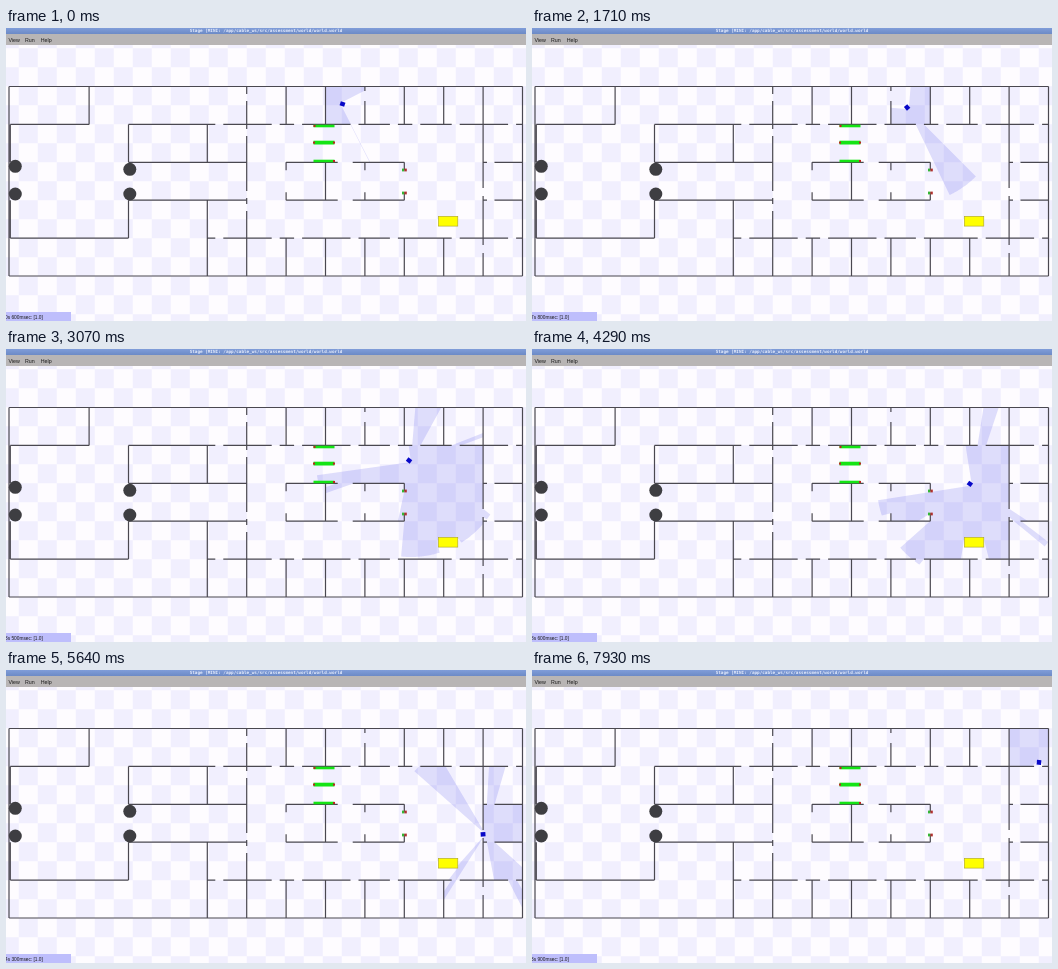
These frames come from a looping animation (520x293 px, 8000 ms). An HTML page:

```html
<!DOCTYPE html>
<html lang="en">
<head>
<meta charset="utf-8">
<title>Robot simulator</title>
<style>
  html, body { margin: 0; width: 100%; height: 100%; overflow: hidden; background: #fff; }
  svg { display: block; width: 100vw; height: 100vh; }
  text { font-family: "Liberation Sans", Arial, sans-serif; font-size: 5.3px; fill: #181818; }
  .title { font: bold 4.3px "DejaVu Sans Mono", monospace; fill: #e6ecfc; }
</style>
</head>
<body>
<svg viewBox="0 0 520 293" preserveAspectRatio="none">
  <defs>
    <pattern id="checker" width="38" height="38" patternUnits="userSpaceOnUse" x="259.75" y="153.25">
      <path d="M0 0h19v19h-19zM19 19h19v19h-19z" fill="#f1effe"/>
    </pattern>
    <linearGradient id="bar" x2="0" y2="1">
      <stop stop-color="#809dd9"/>
      <stop offset="1" stop-color="#6c8ac6"/>
    </linearGradient>
  </defs>
  <rect width="520" height="293" fill="#fefcff"/>
  <rect width="520" height="293" fill="url(#checker)"/>
  <path id="scan" fill="#3c3ce6" fill-opacity=".16"/>
  <path id="walls" fill="none" stroke="#4a4850" stroke-width="1.2"/>
  <g id="objects"></g>
  <rect id="robot" x="-2.4" y="-2.2" width="4.8" height="4.4" fill="#0808c8"/>
  <rect width="520" height="17" fill="#b8b5b5"/>
  <rect width="520" height="6" fill="url(#bar)"/>
  <text class="title" x="260" y="4.2" text-anchor="middle">Stage [MINI: /app/cable_ws/src/assessment/world/world.world</text>
  <text x="2.5" y="13.6">View</text>
  <text x="19" y="13.6">Run</text>
  <text x="34.7" y="13.6">Help</text>
  <rect y="284" width="65" height="9" fill="#bebefc"/>
  <text id="clock" x="-1" y="290.6" style="font-size:4.8px"></text>
</svg>
<script>
const LOOP = 8000, FRAMES = 112;
const RANGE = 95, FOV = 270, RAYS = 540, SENSOR_OFFSET = 2.5;
const $ = id => document.getElementById(id);
const rad = deg => deg * Math.PI / 180;
const solid = [];

// The floor plan is a regular grid of rooms; doors are gaps in its lines.
const col = k => 4.3 + 39.4 * k;
const row = j => 58.5 + 37.9 * j;

function spans(from, to, gaps) {
  const ends = [from, ...gaps.flat(), to], out = [];
  for (let i = 0; i < ends.length; i += 2) out.push([ends[i], ends[i + 1]]);
  return out;
}
const across = (j, from, to, gaps = []) =>
  spans(col(from), col(to), gaps).forEach(([a, b]) => solid.push([a, row(j), b, row(j)]));
const down = (k, from, to, gaps = []) =>
  spans(row(from), row(to), gaps).forEach(([a, b]) => solid.push([col(k), a, col(k), b]));

// One letter per room: a door near its left or right side, or none.
const doors = (sides, first) => [...sides].flatMap((side, i) => {
  if (side === "-") return [];
  const x = col(first + i) + (side === "L" ? 8 : 25);
  return [[x, x + 8]];
});
// Opening of the given size in the middle of a room's side.
const opening = (line, n, size) => {
  const mid = line(n + 0.5);
  return [[mid - size / 2, mid + size / 2]];
};

solid.push([3, row(0), 3, row(5)]);
for (const j of [0, 5]) across(j, -0.03, 13);
down(13, 0, 5);
down(2, 0, 1);

// Hall on the left, with open sides between the pillars.
across(1, 0, 2);
across(4, 0, 3);
for (const k of [0, 3]) down(k, 1, 4, opening(row, 2, 38));

across(1, 3, 13, doors("LRLRRLLR", 5));
across(4, 5, 13, doors("LRLRR-LR", 5));
for (const j of [2, 3]) {
  across(j, 3, 6);
  across(j, 7, 10, opening(col, 8, 15));
  across(j, 12, 13, [[481, 488.5]]);
}
down(5, 1, 2);
down(5, 3, 5);
down(6, 0, 5, [[66, 73], [101, 108], [163, 170], [176, 183]]);
for (let k = 7; k < 13; k++) {
  down(k, 0, 1, k === 9 ? [[63, 73]] : []);
  down(k, 4, 5, k === 12 ? [[217, 225]] : []);
}
for (const k of [7, 9, 10]) down(k, 2, 3, opening(row, 2, 22));
down(8, 2, 3);
down(12, 1, 4, [[160, 168]]);

$("walls").setAttribute("d", solid.map(([a, b, c, d]) => `M${a} ${b}L${c} ${d}`).join(""));

const box = (x, y, w, h, fill, extra = "") =>
  `<rect x="${x}" y="${y}" width="${w}" height="${h}" fill="${fill}" ${extra}/>`;
const disc = (x, y) => `<circle cx="${x}" cy="${y}" r="6.5" fill="#3e3e42"/>`;
const marker = y => box(396, y - 1.4, 2.4, 2.8, "#35b535") + box(398.4, y - 1.4, 2.4, 2.8, "#b03030");

function rack(y, h, ...reds) {
  solid.push([307.5, y, 328.5, y]);
  return box(307.5, y - h / 2, 21, h, "#14e414") +
    reds.map(x => box(x, y - 1, 2, 2, "#c02020")).join("");
}
function table(x, y, w, h) {
  solid.push([x, y, x + w, y], [x, y + h, x + w, y + h], [x, y, x, y + h], [x + w, y, x + w, y + h]);
  return box(x, y, w, h, "#ffff00", 'stroke="#a8a030" stroke-width=".6"');
}

$("objects").innerHTML =
  disc(9.3, 138.3) + disc(9.3, 166) + disc(123.8, 141.3) + disc(123.8, 166) +
  rack(98, 2.6, 307.5) + rack(114.6, 3.8, 307, 327) + rack(133, 2.6, 327) +
  marker(142) + marker(165) + table(432.3, 188.3, 19.5, 9.8);

// Key poses: time, x, y, heading in degrees (clockwise from right).
const route = [
  [0, 336.5, 76, -162], [500, 337, 76, -20], [1710, 375, 79.3, 50],
  [3070, 403, 111.5, 37], [4290, 438, 135, 36], [5400, 471, 161, 34],
  [5640, 477, 164.3, -3], [6000, 481, 160, -70], [6930, 485.5, 130.3, -57],
  [7930, 507, 92.3, -85]
];

// Hermite curve that leaves and reaches each key pose along its heading.
function poseAt(t) {
  const i = route.findIndex(key => key[0] > t);
  if (i < 0) return route.at(-1).slice(1);
  const [t0, x0, y0, h0] = route[i - 1], [t1, x1, y1, h1] = route[i];
  const u = (t - t0) / (t1 - t0), chord = Math.hypot(x1 - x0, y1 - y0);
  const curve = (a, b, trig) =>
    a + (b - a) * u * u * (3 - 2 * u) +
    chord * u * (1 - u) * ((1 - u) * trig(rad(h0)) - u * trig(rad(h1)));
  return [curve(x0, x1, Math.cos), curve(y0, y1, Math.sin), h0 + (h1 - h0) * u];
}

// Distance along a ray to the nearest solid segment.
function cast(x, y, dx, dy) {
  let best = RANGE;
  for (const [x1, y1, x2, y2] of solid) {
    const sx = x2 - x1, sy = y2 - y1, det = dx * sy - dy * sx;
    if (Math.abs(det) < 1e-9) continue;
    const ox = x1 - x, oy = y1 - y;
    const dist = (ox * sy - oy * sx) / det, along = (ox * dy - oy * dx) / det;
    if (dist > 0 && dist < best && along >= 0 && along <= 1) best = dist;
  }
  return best;
}

function scanPath(x, y, heading) {
  let d = `M${x} ${y}`;
  for (let i = 0; i <= RAYS; i++) {
    const a = rad(heading + FOV * (i / RAYS - 0.5));
    const dx = Math.cos(a), dy = Math.sin(a), r = cast(x, y, dx, dy);
    d += `L${(x + dx * r).toFixed(2)} ${(y + dy * r).toFixed(2)}`;
  }
  return d + "Z";
}

function draw(step) {
  const [x, y, heading] = poseAt(step * LOOP / FRAMES);
  const a = rad(heading);
  $("scan").setAttribute("d",
    scanPath(x + SENSOR_OFFSET * Math.cos(a), y + SENSOR_OFFSET * Math.sin(a), heading));
  $("robot").setAttribute("transform", `translate(${x} ${y}) rotate(${heading})`);
  const tenths = 6 + step * 3;
  $("clock").textContent = `${Math.floor(tenths / 10) % 10}s ${tenths % 10}00msec: [1.0]`;
}

let shown = -1;
const start = performance.now();
function tick() {
  const t = (performance.now() - start) % LOOP;
  const step = Math.floor((t + 5) * FRAMES / LOOP) % FRAMES;
  if (step !== shown) draw(shown = step);
  requestAnimationFrame(tick);
}
tick();
</script>
</body>
</html>
```
